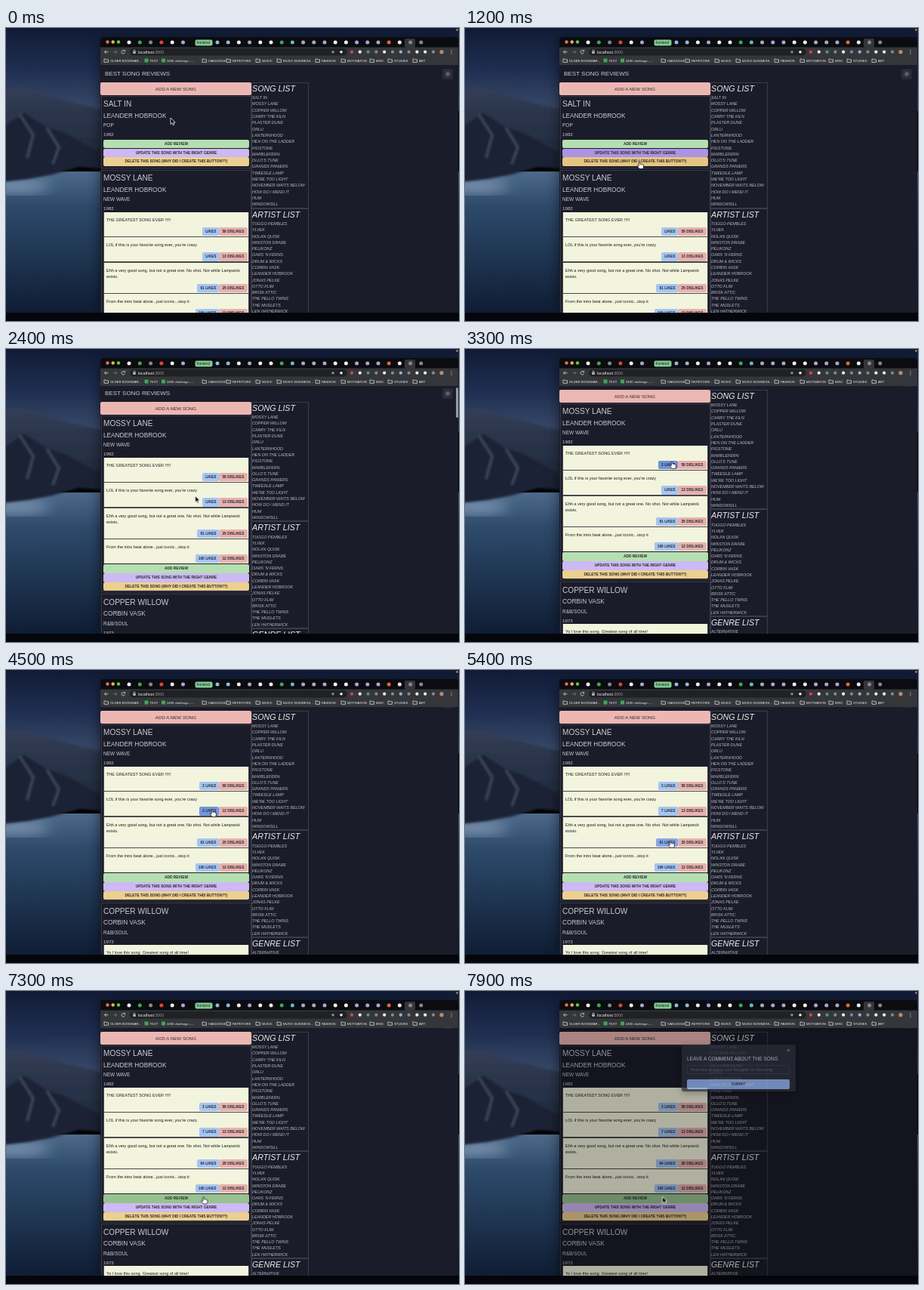
Animation, 600 px wide and 388 px high, one loop 8 s. Source, as an HTML page:

```html
<!DOCTYPE html>
<html lang="en">
<head>
<meta charset="utf-8">
<title>Song reviews</title>
<style>
html, body { margin: 0; width: 100%; height: 100%; overflow: hidden; background: #000; }
#stage { position: relative; width: 600px; height: 388px; overflow: hidden; font-family: "Liberation Sans", Arial, sans-serif; }
#stage > svg, #view, #shade, #modal, #cursor { position: absolute; left: 0; top: 0; }
#stage *, #stage *::before { animation-duration: 8s; animation-iteration-count: infinite; animation-timing-function: step-end; }

/* text is centred on its top coordinate */
.t { position: absolute; line-height: 0; white-space: pre; }
.thin { color: #c9cbd1; }

#view { width: 600px; height: 377px; clip-path: inset(49px 1px 0 125px round 0 0 4px 4px); background: #1b1c29; }
#page { position: absolute; inset: 0; animation-name: scroll; }
#gear { position: absolute; left: 578px; top: 54px; width: 14px; height: 14px; border-radius: 2px; background: #292b38; }
#left { position: absolute; left: 125px; top: 72px; width: 200px; }
.new { height: 17px; margin-bottom: .5px; border-radius: 2px; background: #ecb7b3; color: #33292b; font: 6.2px/17px "Liberation Sans", Arial, sans-serif; text-align: center; }

.song { position: relative; overflow: hidden; }
.song::after { content: ""; position: absolute; inset: 0 0 2px 1px; border: 1px solid #373946; pointer-events: none; }
.head { position: relative; height: 58.4px; }
.head .t { left: 4px; }
.cards { margin: -2px 0 0 4px; width: 191px; padding: 0 1px; background: #484a50; }
.card { position: relative; height: 32px; margin-bottom: 1.4px; background: #f3f4dd; color: #1a1a1c; font-size: 5.53px; }
.card.two { height: 40px; }
.card .t { left: 3px; }
.votes { position: absolute; right: 1.5px; bottom: .6px; display: flex; }
.votes b { padding: 0 4px; border-radius: 2px; white-space: pre; font: bold 4.85px/11.5px "Liberation Sans", Arial, sans-serif; color: #262930; }
.votes b::before { content: attr(data-n); }
.like { background: #a5c5f3; }
.dislike { background: #e8b1ae; }
.act { height: 11.3px; width: 193px; margin: 0 0 .5px 4px; border-radius: 2px; text-align: center; font: bold 4.85px/11.3px "Liberation Sans", Arial, sans-serif; color: #25282a; }
.add { background: #b5dfb1; }
.upd { background: #cdb9f3; }
.del { background: #ecd08f; margin-bottom: 4.7px; }
.cards ~ .del { margin-bottom: 3.7px; }

#right { position: absolute; left: 325px; top: 72px; width: 75.5px; font-style: italic; }
.list { outline: 1px solid #3a3c47; outline-offset: -1px; padding: 0 0 1.2px 1px; }
.list h2 { margin: 0; height: 16.2px; font: italic 10.7px/17px "Liberation Sans", Arial, sans-serif; color: #eceded; }
.list div { height: 8.3px; font-size: 5.35px; line-height: 8.3px; white-space: pre; color: #b9bbc2; overflow: hidden; }
#bar { position: absolute; left: 596px; top: 51px; width: 2.5px; height: 40px; border-radius: 2px; background: #9a9ba2; visibility: hidden; animation-name: bar; }

#shade { width: 600px; height: 377px; clip-path: inset(49px 1px 0 125px); background: #000; opacity: 0; animation-name: shade; }
#modal { left: 287px; top: 71px; width: 151px; height: 62px; border-radius: 3px; background: #292c3a; opacity: 0; box-shadow: 0 2px 8px #0006; animation-name: modal; }
#modal .in, #modal .send { position: absolute; left: 7px; width: 136px; box-sizing: border-box; border-radius: 2px; }
#modal .in { top: 27px; height: 12px; border: 1px solid #3c3f4d; font-size: 5.5px; line-height: 10px; color: #6b6e78; padding-left: 4px; white-space: pre; }
#modal .send { top: 46px; height: 13px; background: #93b3ee; font: bold 5px/13px "Liberation Sans", Arial, sans-serif; text-align: center; color: #333c50; }

#cursor { animation-name: move; }
#cursor svg { position: absolute; left: -5px; top: -3px; }
.arrow { animation-name: arrow; }
.hand { animation-name: hand; }

.song.gone { height: 98px; animation-name: gone; }
.list .out { animation-name: out; }
.gone .upd { animation-name: updHover; }
.gone .del { animation-name: delHover; }
.open .add { animation-name: addHover; }
.l1 { animation-name: hover1; } .l1::before { animation-name: count1; }
.l2 { animation-name: hover2; } .l2::before { animation-name: count2; }
.l3 { animation-name: hover3; } .l3::before { animation-name: count3; }
.d3 { animation-name: hover4; } .d3::before { animation-name: count4; }

@keyframes scroll {
  0%, 27.5% { transform: none; }
  28.75% { transform: translateY(-1px); }
  30% { transform: translateY(-2px); }
  31.25% { transform: translateY(-5px); }
  32.5% { transform: translateY(-5px); animation-timing-function: steps(4); }
  37.5%, 100% { transform: translateY(-18px); }
}
@keyframes bar { 0%, 100% { visibility: hidden; } 27.5% { visibility: visible; } 38.75% { visibility: hidden; } }
@keyframes gone { 0% { height: 98px; } 21.25%, 100% { height: 0; } }
@keyframes out { 0% { height: 8.3px; } 21.25%, 100% { height: 0; } }
@keyframes move {
  0% { transform: translate(218px, 119px); }
  1.25% { transform: translate(218px, 119px); animation-timing-function: steps(5); }
  7.5% { transform: translate(231px, 177px); }
  25% { transform: translate(231px, 177px); animation-timing-function: steps(5); }
  31.25% { transform: translate(255.4px, 198.9px); }
  32.5% { transform: translate(255.4px, 198.9px); animation-timing-function: steps(3); }
  36.25% { transform: translate(274px, 149px); }
  43.75% { transform: translate(274px, 149px); animation-timing-function: steps(4); }
  48.75% { transform: translate(273px, 185px); }
  63.75% { transform: translate(273px, 185px); animation-timing-function: steps(3); }
  67.5% { transform: translate(272px, 226px); }
  73.75% { transform: translate(272px, 226px); animation-timing-function: steps(3); }
  77.5% { transform: translate(297px, 229px); }
  83.75% { transform: translate(297px, 229px); animation-timing-function: steps(6); }
  91.25%, 100% { transform: translate(261.5px, 272.5px); }
}
@keyframes arrow {
  0%, 26.25%, 86.25%, 97.5%, 100% { visibility: visible; }
  5%, 36.25%, 90% { visibility: hidden; }
}
@keyframes hand {
  0%, 26.25%, 86.25%, 97.5%, 100% { visibility: hidden; }
  5%, 36.25%, 90% { visibility: visible; }
}
@keyframes updHover { 0% { background: #cdb9f3; } 6.25%, 100% { background: #ad93e3; } }
@keyframes delHover { 0% { background: #ecd08f; } 7.5%, 100% { background: #e6c581; } }
@keyframes addHover { 0% { background: #b5dfb1; } 91.25%, 100% { background: #97c28f; } }
@keyframes hover1 { 0%, 46.25%, 100% { background: #a5c5f3; } 36.25% { background: #6f93da; } }
@keyframes hover2 { 0%, 65%, 100% { background: #a5c5f3; } 48.75% { background: #7397dc; } }
@keyframes hover3 { 0%, 75%, 100% { background: #a5c5f3; } 67.5% { background: #84a8e8; } }
@keyframes hover4 { 0%, 86.25%, 100% { background: #e8b1ae; } 77.5% { background: #dda39f; } }
@keyframes count1 { 0% { content: ""; } 37.5% { content: "1 "; } 40% { content: "2 "; } 42.5%, 100% { content: "3 "; } }
@keyframes count2 {
  0% { content: ""; } 51.25% { content: "1 "; } 53.75% { content: "2 "; } 56.25% { content: "3 "; }
  60% { content: "4 "; } 61.25% { content: "5 "; } 62.5% { content: "6 "; } 63.75%, 100% { content: "7 "; }
}
@keyframes count3 { 0% { content: "61 "; } 68.75% { content: "62 "; } 70% { content: "63 "; } 73.75%, 100% { content: "64 "; } }
@keyframes count4 { 0% { content: "25 "; } 78.75% { content: "26 "; } 81.25% { content: "27 "; } 83.75%, 100% { content: "28 "; } }
@keyframes shade { 0% { opacity: 0; } 97.5% { opacity: .1; } 98.75%, 100% { opacity: .28; } }
@keyframes modal { 0% { opacity: 0; } 97.5% { opacity: .25; } 98.75%, 100% { opacity: .74; } }
</style>
</head>
<body>
<div id="stage">
  <svg width="600" height="388">
    <defs>
      <linearGradient id="sky" x1="0" y1="0" x2="0" y2="1">
        <stop offset="0" stop-color="#111b36"/><stop offset=".5" stop-color="#1f2e50"/><stop offset="1" stop-color="#3a4b6b"/>
      </linearGradient>
      <linearGradient id="sea" x1="0" y1="0" x2="0" y2="1">
        <stop offset="0" stop-color="#4d6a8a"/><stop offset=".25" stop-color="#2d4a6b"/><stop offset="1" stop-color="#0f1d34"/>
      </linearGradient>
      <linearGradient id="hill" x1="0" y1="0" x2="0" y2="1">
        <stop offset="0" stop-color="#323d55"/><stop offset="1" stop-color="#192334"/>
      </linearGradient>
      <filter id="soft"><feGaussianBlur stdDeviation="1.5"/></filter>
      <filter id="wide" x="-20%" y="-20%" width="140%" height="140%"><feGaussianBlur stdDeviation="9"/></filter>
    </defs>
    <rect width="600" height="110" fill="url(#sky)"/>
    <rect y="190" width="600" height="187" fill="url(#sea)"/>
    <ellipse cx="12" cy="209" rx="46" ry="9" fill="#7f97b3" filter="url(#wide)"/>
    <g filter="url(#soft)">
      <path d="M-5 82 Q18 76 36 83 T70 94 T130 108 V186 L96 184 L62 194 L30 200 L-5 204Z" fill="url(#hill)"/>
      <path d="M-5 132 L24 112 L52 130 L80 140 L130 168 V187 L92 183 L58 192 L-5 200Z" fill="#1a2436"/>
      <path d="M18 114 L36 142 L28 172 M54 132 L70 158 L62 180" fill="none" stroke="#3c4860" stroke-width="3"/>
    </g>
    <rect x="125" y="16" width="474" height="361" opacity=".55" filter="url(#wide)"/>
    <rect y="377" width="600" height="11" fill="#04060b"/>
    <circle cx="597.5" cy="2.5" r="1.2" fill="#d99a45"/>
  </svg>

  <div id="view">
    <div id="page">
      <div class="t thin" style="left:131px;top:61px;font-size:8.05px">BEST SONG REVIEWS</div>
      <div id="gear"><svg width="14" height="14" fill="none" stroke="#a6a8b0" stroke-width=".8"><circle cx="7" cy="7" r="1.5"/><circle cx="7" cy="7" r="3.2" stroke-dasharray="1 1.5"/></svg></div>
      <div id="left"></div>
      <div id="right"></div>
    </div>
    <div id="bar"></div>
  </div>

  <svg width="600" height="388">
    <path d="M125 49V16a4 4 0 0 1 4-4H595a4 4 0 0 1 4 4V49Z" fill="#0b0c0f"/>
    <rect x="125" y="25.5" width="474" height="23.5" fill="#35363a"/>
    <rect x="528" y="14" width="14" height="12" rx="2" fill="#35363a"/>
    <rect x="164" y="27" width="288" height="9.5" rx="4.7" fill="#202124"/>
    <circle cx="134.5" cy="18.5" r="2.2" fill="#ee6a5f"/>
    <circle cx="141.7" cy="18.5" r="2.2" fill="#e5b64a"/>
    <circle cx="149" cy="18.5" r="2.2" fill="#62c655"/>
    <rect x="250.5" y="15.5" width="23" height="8" rx="2" fill="#81c995"/>
    <g fill="none" stroke="#d4d6db" stroke-width=".8">
      <path d="M135.5 31.7H130.5M132.7 29.5L130.5 31.7L132.7 33.9"/>
      <path d="M142 31.7H147M144.8 29.5L147 31.7L144.8 33.9" stroke="#77797e"/>
      <path d="M157.3 30.5A2.3 2.3 0 1 0 157.5 32.5M157.6 28.9V30.7H155.8"/>
      <path d="M168.8 31.5V30.3A1.2 1.2 0 0 1 171.2 30.3V31.5"/>
    </g>
    <rect x="168.3" y="31.2" width="3.4" height="2.6" fill="#c8cacf"/>
    <g font-family="Liberation Sans, Arial, sans-serif" fill="#eef0f3">
      <text x="252.5" y="21.3" font-size="4.8" fill="#202124">frontend</text>
      <text x="175" y="33.5" font-size="5.3">localhost<tspan fill="#9a9ca1">:3000</tspan></text>
      <g id="marks" font-size="4.25"></g>
    </g>
  </svg>

  <div id="shade"></div>
  <div id="modal">
    <div class="t" style="left:7px;top:19px;font-size:6.5px;color:#d6d8de">LEAVE A COMMENT ABOUT THE SONG</div>
    <div class="t" style="left:139px;top:8px;font-size:8px;color:#b4b6be">×</div>
    <div class="in">Feel free to leave your thoughts on this song</div>
    <div class="send">SUBMIT</div>
  </div>

  <div id="cursor">
    <svg class="arrow" width="16" height="18"><path d="M5 3V11.5L7 9.7L8.4 12.7L9.9 12L8.5 9.1H11.2Z" fill="#000" stroke="#fff" stroke-width=".8"/></svg>
    <svg class="hand" width="16" height="18"><path d="M4.2 3.5Q5 2.3 5.9 3.5V6.3Q6.8 5.7 7.5 6.5Q8.4 6 9 6.9Q10.4 6.6 10.4 8V10Q10.2 11.3 9.4 12.5H5.2Q3.8 10.9 2.3 8.7Q2.2 7.5 3.5 8L4.2 8.7Z" fill="#fff" stroke="#000" stroke-width=".7"/></svg>
  </div>
</div>

<script>
const $ = id => document.getElementById(id);
const text = (y, size, s, cls = '') => `<div class="t ${cls}" style="top:${y}px;font-size:${size}px">${s}</div>`;

function card({ lines, likes, dislikes, key = '' }) {
  const rows = lines.map((s, i) => text(10 + i * 8.3, 5.53, s)).join('');
  return `<div class="card ${lines.length > 1 ? 'two' : ''}">${rows}<div class="votes">` +
    `<b class="like ${key && 'l' + key}" data-n="${likes}">LIKES</b>` +
    `<b class="dislike ${key === 3 ? 'd3' : ''}" data-n="${dislikes}">DISLIKES</b></div></div>`;
}

function song(cls, title, artist, genre, year, reviews = []) {
  const cards = reviews.length ? `<div class="cards">${reviews.map(card).join('')}</div>` : '';
  return `<div class="song ${cls}"><div class="head">` +
    text(11.5, 10.1, title, 'thin') + text(27, 8.25, artist, 'thin') +
    text(39.5, 6.5, genre, 'thin') + text(51.5, 6.2, year, 'thin') + `</div>${cards}` +
    '<div class="act add">ADD REVIEW</div>' +
    '<div class="act upd">UPDATE THIS SONG WITH THE RIGHT GENRE</div>' +
    '<div class="act del">DELETE THIS SONG (WHY DID I CREATE THIS BUTTON??)</div></div>';
}

$('left').innerHTML = '<div class="new">ADD A NEW SONG</div>' +
  song('gone', 'SALT IN', 'LEANDER HOBROOK', 'POP', 1982) +
  song('open', 'MOSSY LANE', 'LEANDER HOBROOK', 'NEW WAVE', 1982, [
    { lines: ['THE GREATEST SONG EVER !!!!!'], likes: '', dislikes: '58 ', key: 1 },
    { lines: ["LOL if this is your favorite song ever, you're crazy"], likes: '', dislikes: '13 ', key: 2 },
    { lines: ['Ehh a very good song, but not a great one. No shot. Not while Lampwick', 'exists.'], likes: '61 ', dislikes: '25 ', key: 3 },
    { lines: ['From the intro beat alone...just iconic...stop it'], likes: '100 ', dislikes: '12 ' }
  ]) +
  song('', 'COPPER WILLOW', 'CORBIN VASK', 'R&amp;B/SOUL', 1973, [
    { lines: ['Yo I love this song. Greatest song of all time!'], likes: '', dislikes: '' }
  ]);

const list = (title, items, first = '') => `<div class="list"><h2>${title}</h2>` +
  items.split('|').map((s, i) => `<div class="${i ? '' : first}">${s}</div>`).join('') + '</div>';

$('right').innerHTML =
  list('SONG LIST', "SALT IN|MOSSY LANE|COPPER WILLOW|CARRY THE KILN|PLASTER DUNE|ORLU|LANTERNHOOD|HEN ON THE LADDER|FIGSTONE|MARBLEFERN|OLLO'S TUNE|GRANDS PANIERS|TWEEDLE LAMP|WE'RE TOO LIGHT|NOVEMBER WAITS BELOW|HOW DO I MEND IT|HUM|WINDOWSILL", 'out') +
  list('ARTIST LIST', "TUGGO PEMBLES|YLVEK|NOLAN QUISK|WINSTON DRABE|PELIKONZ|OARS 'N FERNS|DRUM &amp; WICKS|CORBIN VASK|LEANDER HOBROOK|JONAS PELKE|OTTO FLIM|BRISK ATTIC|THE PELLO TWINS|THE MUDLETS|LEN HATHERWICK") +
  list('GENRE LIST', 'ALTERNATIVE');

// Browser bar: bookmarks, tab icons, toolbar icons
const folder = x => `<path d="M${x} 41h2l.8 .8h2.7v3.5h-5.5z" fill="none" stroke="#d4d6db" stroke-width=".8"/>`;
const square = (x, y, c) => `<rect x="${x}" y="${y}" width="5" height="5" rx=".8" fill="${c}"/>`;
const dot = (x, y, r, c) => `<circle cx="${x}" cy="${y}" r="${r}" fill="${c}"/>`;
const tint = { w: '#eceef2', g: '#3fa65a', r: '#e0433a', p: '#a9a6dc', b: '#8db9e8', t: '#62bcc4', o: '#e8663c', k: '#85888f' };
const icons = (names, x0, step, y, r) => [...names].map((c, i) => dot(x0 + i * step, y, r, tint[c])).join('');

const sheets = ['TEXT', '2400 challenge –...'];
const marks = [[138, 'OLDER BOOKMAR...'], [190.5, sheets[0]], [213, sheets[1]], [268, 'OAKLEDGE'], [300, 'REPETOIRE'],
  [339, 'MUSIC'], [367, 'MUSIC BUSINESS...'], [418, 'FASHION'], [452, 'MOTIVATION'], [490, 'MISC'], [514, 'STUDIES'], [547, 'ART']];

$('marks').innerHTML =
  marks.map(([x, s]) => (sheets.includes(s) ? square(x - 7, 40.5, tint.g) : folder(x - 8)) +
    `<text x="${x}" y="44.5">${s}</text>`).join('') +
  icons('wgkrwp', 163, 14.3, 19, 2.5) +
  icons('bbwpwwgtpppwwpppowkk', 280, 14.2, 19, 2.5) +
  icons('kw', 433, 11, 31.7, 1.8) +
  icons('rwgkwkbkwwk', 458, 10.8, 31.7, 2.1) +
  dot(577, 31.7, 2.6, '#b98a6c') +
  [29.5, 31.7, 33.9].map(y => dot(590, y, .6, '#c8cacf')).join('');
</script>
</body>
</html>
```
